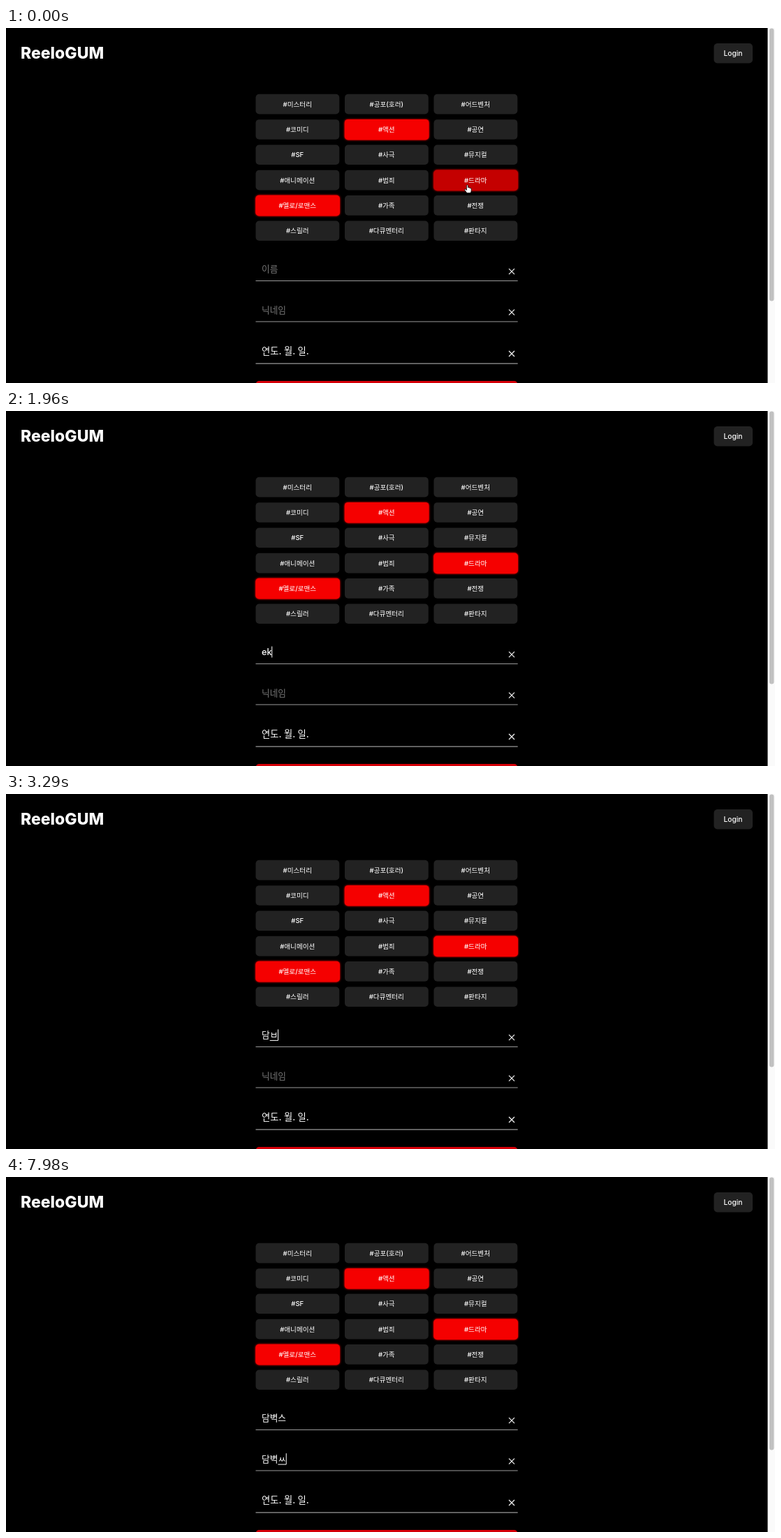
An HTML page for the animation above (8 s loop, 1101 by 509 pixels).

```html
<!DOCTYPE html>
<html lang="ko">
<head>
<meta charset="utf-8">
<title>Sign-up form</title>
<style>
  html, body { margin: 0; width: 100%; height: 100%; overflow: hidden; background: #000; }
  svg { display: block; width: 1101px; height: 509px; }
  text { font-family: Inter, "Noto Sans CJK KR", "Noto Sans CJK", sans-serif; fill: #fff; white-space: pre; }
  .logo { font-size: 23px; font-weight: 800; }
  .tag { font-size: 9.6px; font-weight: 500; text-anchor: middle; }
  .value { font-size: 12.7px; font-weight: 500; }
  .hint { fill: #757575; font-weight: 400; }
  .date { font-size: 13.3px; }
  .box { fill: #222; }
  .on { fill: #f50000; filter: drop-shadow(0 0 1.5px #f00); }
  .on.hover { fill: #c40000; }
  .line { stroke: #999; stroke-width: 1.2; }
  .bad .line { stroke: #d00000; stroke-width: 1.6; filter: drop-shadow(0 1px 1.5px #f00); }
  .clear { stroke: #fff; stroke-width: 1.1; }
  .caret, .compose { fill: #fff; }
  .pointer path { fill: #fff; stroke: #000; stroke-width: .8; stroke-linejoin: round; }
</style>
</head>
<body>
<svg id="stage" viewBox="0 0 1101 509">
  <rect width="1101" height="509"/>
  <text class="logo" x="21" y="43.5">ReeloGUM</text>
  <rect class="box" x="1013.5" y="22" width="55.5" height="28.5" rx="5"/>
  <text class="tag" x="1041" y="39.8" style="font-size:10.2px">Login</text>
  <rect x="1090.5" width="10.5" height="509" fill="#fafafa"/>
  <rect x="1093" y="0.5" width="6.5" height="391" rx="3.2" fill="#c1c1c1"/>
  <g id="tags"></g>
  <g id="fields"></g>
  <rect x="357.5" y="506" width="375" height="30" rx="5" fill="#d40008"/>
  <g id="mouse">
    <g class="pointer" data-kind="hand">
      <path d="M-1.6 0V-4.3Q-.6-5.7.4-4.3V-1.2Q1.5-2.2 2.1-.8Q3.2-1.6 3.8-.2Q5-.7 5.2.8V3.2Q5 5 4 6.6H-1.2Q-2.2 4.6-4.4 2.2Q-4.8.6-3.2 1L-1.6 2.4Z"/>
    </g>
    <g class="pointer" data-kind="arrow">
      <path d="M-3-6V5L-.6 2.8L1 6.4L2.8 5.6L1.2 2.1H4.6Z"/>
    </g>
    <g class="pointer" data-kind="beam" fill="none">
      <path d="M-3-6.5Q0-6.5 0-4.5Q0-6.5 3-6.5M0-4.5V4.5M-3 6.5Q0 6.5 0 4.5Q0 6.5 3 6.5M-1.5 1.5H1.5" style="fill:none;stroke:#fff;stroke-width:2.4"/>
      <path d="M-3-6.5Q0-6.5 0-4.5Q0-6.5 3-6.5M0-4.5V4.5M-3 6.5Q0 6.5 0 4.5Q0 6.5 3 6.5M-1.5 1.5H1.5" style="fill:none;stroke-width:.9"/>
    </g>
  </g>
</svg>
<script>
const LOOP = 8000, TICK = 70;
const genres = `미스터리 공포(호러) 어드벤처 코미디 액션 공연 SF 사극 뮤지컬
  애니메이션 범죄 드라마 멜로/로맨스 가족 전쟁 스릴러 다큐멘터리 판타지`.split(/\s+/);
const chosen = ['액션', '드라마', '멜로/로맨스'];

// Each step: start time, committed text, syllable being composed
const typing = [
  [[0, ''], [1400, 'e'], [1540, 'ek'], [1680, 'eka'], [1960, 'ek'], [2170, 'e'], [2240, ''],
   [2730, '', 'ㄷ'], [2870, '', '다'], [3080, '', '담'], [3290, '담', 'ㅂ'], [3430, '담', '벼'],
   [3500, '담', '벽'], [3710, '담', '벿'], [3850, '담벽', '스'], [4060, '담벽스']],
  [[0, ''], [4690, '', 'ㄷ'], [4830, '', '다'], [4970, '', '담'], [5250, '담', 'ㅂ'], [5390, '담', '벼'],
   [5460, '담', '벽'], [7000, '담벽', 'ㅆ'], [7560, '담벽', '쓰'], [7980, '담벽', 'ㅆ']]
];
const caretOff = [[0, 700], [1050, 1400], [2240, 2590], [6020, 6510]];
const shakeStart = 2240, shakeEnd = 2590;
const shakeAngles = [0.6, -1.07, 1.07, -0.8, 0.4];

const $ = id => document.getElementById(id);
function add(parent, name, attrs, text = '') {
  const el = document.createElementNS('http://www.w3.org/2000/svg', name);
  for (const key in attrs) el.setAttribute(key, attrs[key]);
  el.textContent = text;
  return parent.appendChild(el);
}
const within = (t, [from, to]) => t >= from && t < to;
const show = (el, visible) => el.style.display = visible ? '' : 'none';

let drama;
genres.forEach((genre, i) => {
  const x = 357.5 + i % 3 * 127.5, y = 94.8 + Math.floor(i / 3) * 36.33;
  const on = chosen.includes(genre), grow = on ? 0.5 : 0;
  const box = add($('tags'), 'rect', {
    class: on ? 'on' : 'box', x: x - grow / 2, y: y - grow / 2,
    width: 119.8 + 2 * grow, height: 28.6 + 2 * grow, rx: 5
  });
  if (genre === '드라마') drama = box;
  add($('tags'), 'text', { class: 'tag', x: x + 59.8, y: y + 17.9 }, '#' + genre);
});

const fields = [['이름', 362.5], ['닉네임', 421], ['연도. 월. 일.', 481.2]].map(([hint, y], i) => {
  const group = add($('fields'), 'g', {});
  const base = [350.3, 409, 468.4][i], cross = [349.2, 407.7, 467][i];
  add(group, 'line', { class: 'line', x1: 357.5, x2: 732.7, y1: y, y2: y });
  const text = add(group, 'text', { class: 'value', x: 366, y: base }, hint);
  if (i === 2) text.classList.add('date');
  const compose = add(group, 'rect', { class: 'compose', y: base + 2.6, height: 1 });
  const caret = add(group, 'rect', { class: 'caret', y: base - 12.8, width: 1, height: 16 });
  show(compose, false);
  show(caret, false);
  add($('fields'), 'path', { class: 'clear', d: `M720 ${cross - 4}l8 8m0-8l-8 8` });
  return { group, text, hint, compose, caret };
});

function drawField(i, t) {
  const { group, text, hint, compose, caret } = fields[i];
  const [, done, syllable = ''] = typing[i].findLast(step => step[0] <= t);
  const value = done + syllable;
  text.textContent = value || hint;
  text.classList.toggle('hint', !value);
  const end = 366 + (value ? text.getComputedTextLength() : -0.5);
  const start = done && syllable ? 366 + text.getSubStringLength(0, done.length) : 366;
  show(compose, syllable);
  if (syllable) {
    compose.setAttribute('x', start);
    compose.setAttribute('width', end - start);
  }
  const focused = i === (t < 4340 ? 0 : 1);
  show(caret, focused && !caretOff.some(span => within(t, span)));
  caret.setAttribute('x', end - 0.3);

  const shaking = i === 0 && within(t, [shakeStart, shakeEnd]);
  const angle = shaking ? shakeAngles[Math.floor((t - shakeStart) / TICK)] : 0;
  group.classList.toggle('bad', shaking);
  group.setAttribute('transform', `rotate(${angle} 545 362.8)`);
}

function drawMouse(t) {
  const p = Math.min(1, Math.floor(t / TICK) / 10);
  const ease = p * p * (3 - 2 * p);
  const x = 661 - 255 * ease, y = 230 + 116 * ease;
  const onTag = y < 305 && (y - 94.8) % 36.33 < 28.6 && (x - 357.5) % 127.5 < 119.8;
  const kind = y > 332 ? 'beam' : onTag ? 'hand' : 'arrow';
  show($('mouse'), t < 1400);
  $('mouse').setAttribute('transform', `translate(${x} ${y})`);
  for (const el of $('mouse').children) show(el, el.dataset.kind === kind);
  drama.classList.toggle('hover', x > 612.5 && y < 232.5);
}

function draw() {
  const t = performance.now() % LOOP;
  drawField(0, t);
  drawField(1, t);
  drawMouse(t);
  requestAnimationFrame(draw);
}
draw();
</script>
</body>
</html>
```
